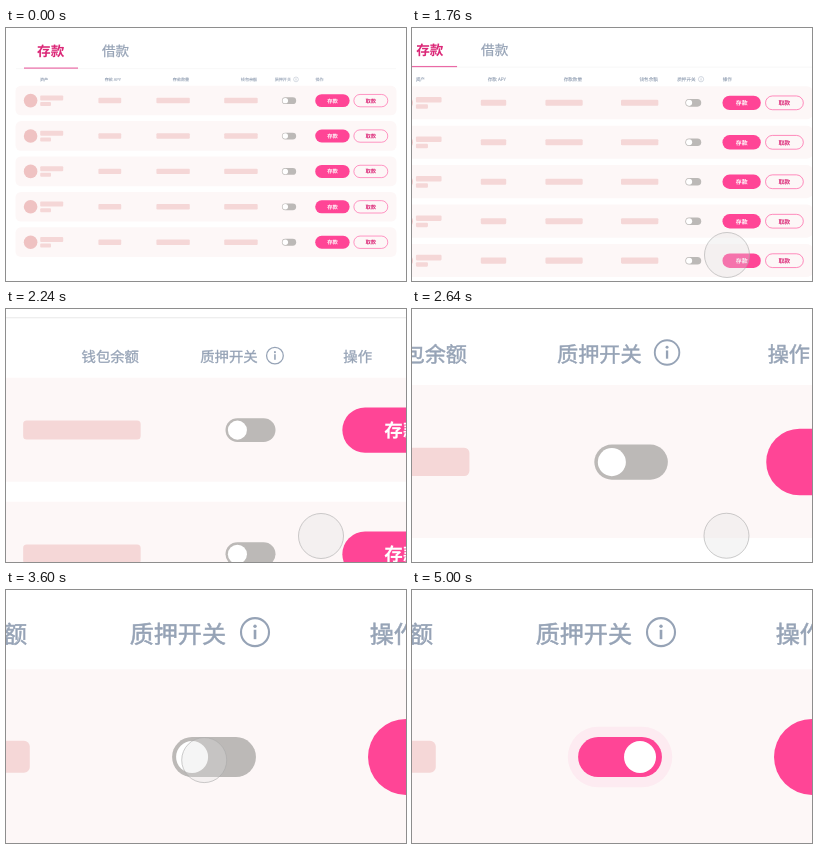
An HTML page for the animation above (6.4 s loop, 400x253 px).

```html
<!DOCTYPE html>
<html>
<head>
<meta charset="utf-8">
<title>Deposit table</title>
<style>
  html, body { margin: 0; width: 100%; height: 100%; overflow: hidden; background: #fff; }
  svg { display: block; width: 100vw; height: 100vh; }
  text {
    font-family: "Noto Sans CJK SC", "Noto Sans CJK", "Noto Sans", sans-serif;
    text-rendering: geometricPrecision;
  }
  .head { font-size: 4.1px; fill: #96a3b6; stroke: #96a3b6; stroke-width: .09px; }
  .button { font-size: 5.3px; font-weight: 700; text-anchor: middle; }
  .tab { font-size: 13.6px; }
</style>
</head>
<body>
<svg viewBox="0 0 400 253">
  <g id="page">
    <path d="M10 40.6H390" stroke="#e8e8e8" stroke-width=".3"/>
    <g id="heads"></g>
    <g fill="none" stroke="#96a3b6">
      <circle cx="290" cy="51.4" r="2.38" stroke-width=".36"/>
      <path d="M290 51V52.6" stroke-width=".45"/>
      <circle cx="290" cy="50.4" r=".29" fill="#96a3b6" stroke="none"/>
    </g>
    <g id="rows"></g>
  </g>
  <g id="tabs">
    <text class="tab" x="31.1" y="28.2" font-weight="700" fill="#db2777">存款</text>
    <text class="tab" x="96" y="28.2" fill="#96a3b6" stroke="#96a3b6" stroke-width=".25">借款</text>
    <rect x="18" y="39.5" width="54" height="1.2" fill="#ea6aa6"/>
  </g>
  <circle id="cursor" r="22.5" fill="rgba(220,220,220,.3)" stroke="rgba(170,170,170,.6)" stroke-width="1"/>
</svg>
<script>
const LOOP = 6400;
const ZOOM = { x: 298.4, y: 53.3, scale: 5.88 };
const PITCH = 35.4;
const OFF = [188, 185, 183], ON = [255, 69, 150];
const PINK = '#ff4596', BAR = '#f5d7d7';

const $ = id => document.getElementById(id);
const lerp = (a, b, p) => a + (b - a) * p;
const span = (t, from, length) => Math.min(1, Math.max(0, (t - from) / length));

function add(parent, name, attrs, text) {
  const el = document.createElementNS('http://www.w3.org/2000/svg', name);
  for (const key in attrs) el.setAttribute(key, attrs[key]);
  if (text) el.textContent = text;
  parent.appendChild(el);
  return el;
}

function box(parent, x, y, width, height, rx, fill) {
  return add(parent, 'rect', { x, y, width, height, rx, fill });
}

// CSS-style cubic easing, solved by bisection.
function bezier(x1, y1, x2, y2) {
  const at = (a, b, u) => 3 * (1 - u) * (1 - u) * u * a + 3 * (1 - u) * u * u * b + u * u * u;
  return p => {
    if (p <= 0 || p >= 1) return p <= 0 ? 0 : 1;
    let lo = 0, hi = 1;
    for (let i = 0; i < 30; i++) {
      const mid = (lo + hi) / 2;
      if (at(x1, x2, mid) < p) lo = mid; else hi = mid;
    }
    return at(y1, y2, lo);
  };
}

const standard = bezier(.4, 0, .2, 1);
const inOut = bezier(.42, 0, .58, 1);

function spring(t, from, rate) {
  const x = Math.max(0, t - from) / 1000 * rate;
  return 1 - (1 + x) * Math.exp(-x);
}

function makeRow(i) {
  const g = add($('rows'), 'g', { transform: `translate(0 ${i * PITCH})` });
  box(g, 9.5, 57.7, 381, 29.65, 5.5, '#fdf7f7');
  add(g, 'circle', { cx: 24.6, cy: 72.6, r: 6.8, fill: '#efc2c2' });
  box(g, 34.2, 67.4, 23, 5, 1, BAR);
  box(g, 34.2, 74, 10.8, 4, 1, BAR);
  for (const [x, w] of [[92.4, 22.8], [150.4, 33.4], [218.2, 33.5]]) box(g, x, 69.87, w, 5.45, 1, BAR);

  const halo = add(g, 'rect', { fill: PINK, 'fill-opacity': .07, visibility: 'hidden' });
  const track = box(g, 275.9, 69.24, 14.26, 6.8, 3.4, `rgb(${OFF})`);
  const knob = add(g, 'circle', { cx: 279.3, cy: 72.64, r: 2.72, fill: '#fff' });

  box(g, 309.22, 66.17, 34.4, 12.92, 6.46, PINK);
  add(g, 'text', { class: 'button', x: 326.5, y: 74.7, fill: '#fff' }, '存款');
  const outline = box(g, 347.87, 66.45, 33.9, 12.36, 6.18, 'none');
  outline.setAttribute('stroke', PINK);
  outline.setAttribute('stroke-width', .55);
  add(g, 'text', { class: 'button', x: 364.7, y: 74.7, fill: '#db2777' }, '取款');
  return { halo, track, knob };
}

const heads = [
  [34, '资产'], [115, '存款 APY', 'end'], [166.8, '存款数量'],
  [234.85, '钱包余额'], [268.7, '质押开关'], [309.5, '操作']
];
for (const [x, label, anchor] of heads) {
  add($('heads'), 'text', { class: 'head', x, y: 53.2, 'text-anchor': anchor || 'start' }, label);
}
const toggle = [0, 1, 2, 3, 4].map(makeRow)[0];

function drawCamera(t) {
  const grow = (ZOOM.scale - 1) * standard(span(t, 1584, 1848));
  $('page').setAttribute('transform',
    `translate(${-ZOOM.x * grow} ${-ZOOM.y * grow}) scale(${1 + grow})`);
  $('tabs').setAttribute('transform', `translate(${-235 * grow} ${-13.5 * grow})`);
}

function drawToggle(t) {
  const p = inOut(span(t, 3710, 732));
  const spread = 1.75 * p;
  const rgb = OFF.map((c, i) => Math.round(lerp(c, ON[i], p)));
  toggle.track.setAttribute('fill', `rgb(${rgb})`);
  toggle.knob.setAttribute('cx', lerp(279.3, 286.43, p));
  const shape = {
    x: 275.9 - spread, y: 69.24 - spread,
    width: 14.26 + 2 * spread, height: 6.8 + 2 * spread,
    rx: 3.4 + spread, visibility: p > 0 ? 'visible' : 'hidden'
  };
  for (const key in shape) toggle.halo.setAttribute(key, shape[key]);
}

function drawCursor(t) {
  const enter = inOut(span(t, 1070, 250));
  const approach = spring(t, 2630, 8.9);
  const leave = Math.pow(span(t, 3760, 640), 1.65);
  const x = lerp(349, 315, enter) - 117 * approach - 3 * leave;
  const y = lerp(252, 227, enter) - 57 * approach + 107 * leave;
  const cursor = $('cursor');
  cursor.setAttribute('cx', x);
  cursor.setAttribute('cy', y);
  cursor.setAttribute('visibility', t >= 1040 && t < 4400 ? 'visible' : 'hidden');
}

function render(t) {
  drawCamera(t);
  drawToggle(t);
  drawCursor(t);
}

const start = performance.now();
function tick() {
  render((performance.now() - start) % LOOP);
  requestAnimationFrame(tick);
}
tick();
</script>
</body>
</html>
```
